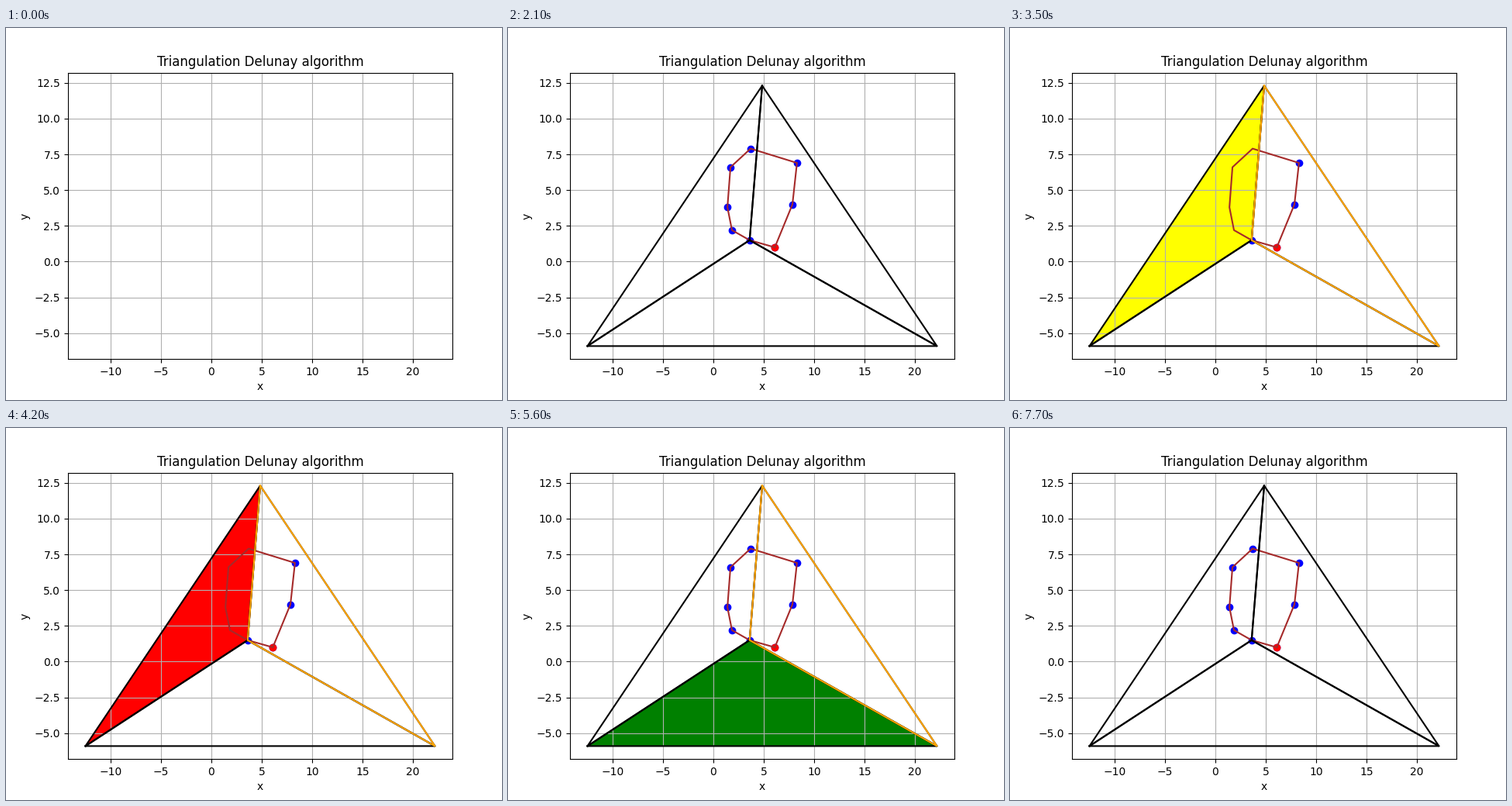
A matplotlib script for the animation above (8000 ms loop, 640 px wide and 480 px high).

```python
import matplotlib.pyplot as plt
from matplotlib.animation import FuncAnimation

TICK = 50           # ms per frame
FRAMES = 160
HOLD = 7            # frames per step

points = [(6.1, 1.0), (7.85, 4.0), (8.3, 6.9), (3.7, 7.9),
          (1.7, 6.6), (1.4, 3.8), (1.85, 2.2), (3.6, 1.5)]
left, right, apex = (-12.49, -5.9), (22.19, -5.9), (4.85, 12.3)
inner, probe = points[-1], points[0]
triangles = {
    "left": (left, apex, inner),
    "right": (apex, right, inner),
    "bottom": (left, right, inner),
}

# Triangle flashed at each step; every other step shows the plain mesh.
flashes = {
    5: ("right", "yellow"), 7: ("right", "green"),
    10: ("left", "yellow"), 12: ("left", "red"),
    14: ("bottom", "yellow"), 16: ("bottom", "green"),
    18: ("left", "yellow"), 20: ("left", "red"),
}

fig, ax = plt.subplots(figsize=(6.4, 4.8), dpi=100)
ax.set_title("Triangulation Delunay algorithm")
ax.set_xlabel("x")
ax.set_ylabel("y")
ax.grid(True)


def outline(corners, color):
    xs, ys = zip(*corners, corners[0])
    return ax.plot(xs, ys, color=color, lw=1.5)[0]


dots = ax.scatter(*zip(*points), color="blue")
hull = outline(points, "brown")
mesh = [outline(t, "black") for t in triangles.values()]
marker = ax.scatter(*probe, color="red")
fills = {key: ax.fill(*zip(*triangles[key[0]]), color=key[1])[0]
         for key in dict.fromkeys(flashes.values())}
chosen = outline(triangles["right"], "orange")

pad_x = 0.05 * (right[0] - left[0])
pad_y = 0.05 * (apex[1] - left[1])
ax.set_xlim(left[0] - pad_x, right[0] + pad_x)
ax.set_ylim(left[1] - pad_y, apex[1] + pad_y)


def update(frame):
    step = frame // HOLD
    dots.set_visible(step >= 1)
    hull.set_visible(step >= 2)
    for line in mesh:
        line.set_visible(step >= 3)
    marker.set_visible(step >= 4)
    chosen.set_visible(9 <= step < 22)
    for key, patch in fills.items():
        patch.set_visible(flashes.get(step) == key)
    return [dots, hull, *mesh, marker, *fills.values(), chosen]


anim = FuncAnimation(fig, update, frames=FRAMES, interval=TICK,
                     repeat=True, repeat_delay=0, blit=False)
plt.show()
```
